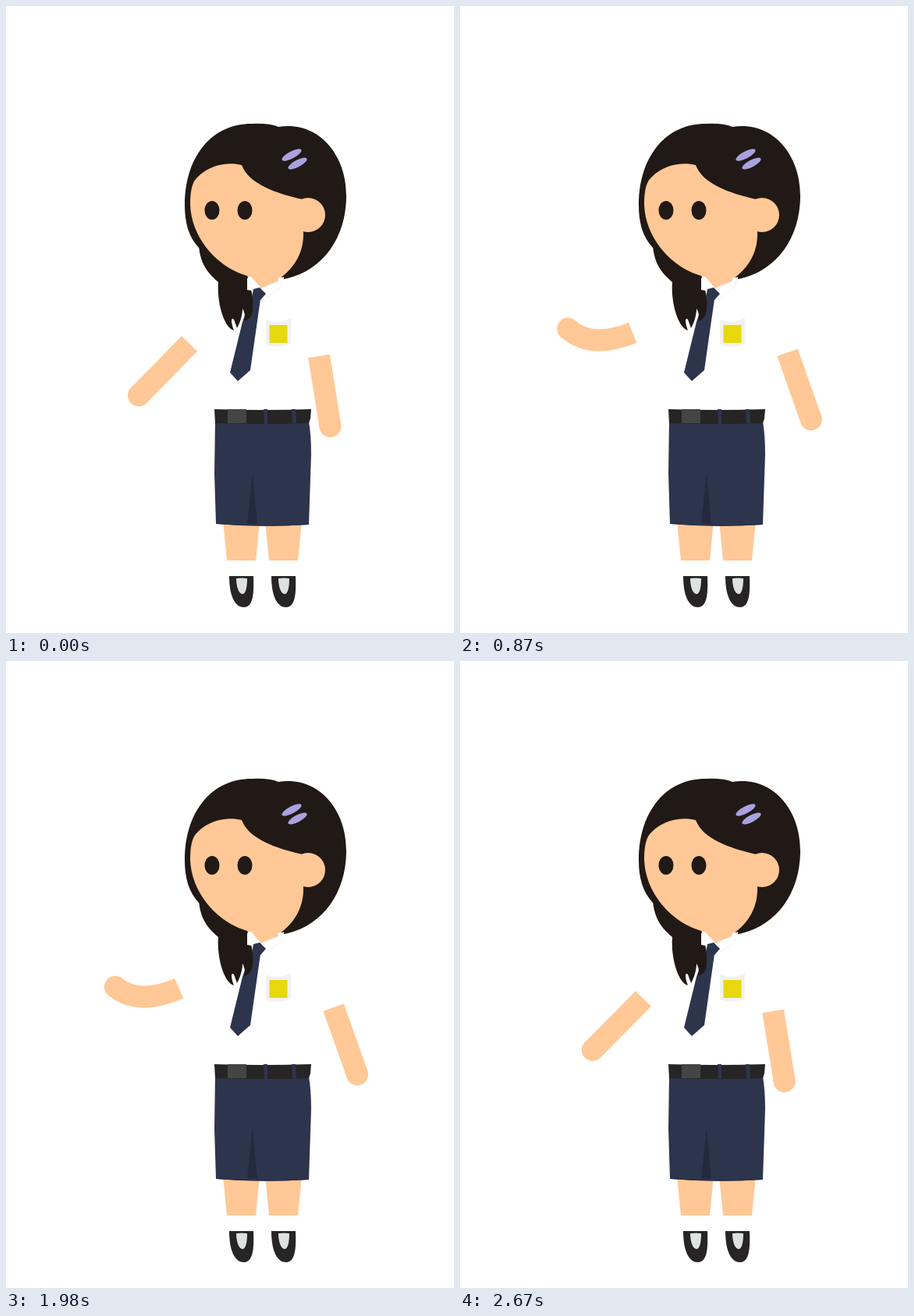
Animation of 574x804 px, one loop 2700 ms. Source, as an HTML page:

```html
<!DOCTYPE html>
<html lang="en">
<head>
<meta charset="utf-8">
<title>Waving student</title>
<style>
  html, body { margin: 0; width: 100%; height: 100%; overflow: hidden; background: #fff; }
  svg { display: block; width: 574px; height: 804px; }
  .skin { fill: #ffc896; }
  .hair { fill: #211915; }
  .navy { fill: #2d354d; }
  .dark { fill: #262424; }
  .limb { fill: none; stroke: #ffc896; stroke-width: 28; }
</style>
</head>
<body>
<svg viewBox="0 0 574 804">
  <defs>
    <g id="leg">
      <path class="skin" d="M278 660H325L320 711H283Z"/>
      <path class="dark" d="M286 731H317C318 756 316 770 305 771C292 771 286 754 286 731Z"/>
      <path fill="#dde2e0" d="M295 734Q302 733 309 734C309 746 307 754 303 754C298 754 295 744 295 734Z"/>
    </g>
  </defs>
  <use href="#leg"/>
  <use href="#leg" x="54"/>

  <path class="navy" d="M268 533L267 600L269 664Q328 669 388 665L391 575Q391 550 388 533Z"/>
  <path fill="none" stroke="#232a40" d="M269 663.5Q328 668.5 388 664.5"/>
  <path fill="#232a40" d="M316 598L309 663L322 664Z"/>
  <path class="dark" d="M267 517Q330 519 391 517L390 529L388 535Q330 537 268 535Z"/>
  <path fill="#454545" d="M284 517H308V535H284Z"/>
  <path class="navy" d="M330 517H335V536H331ZM366 517H371L372 535H367Z"/>

  <path class="navy" d="M314 372L326 376L313 467L297 481L287 470L303 405Z"/>
  <path class="hair" d="M247 305C248 335 265 348 272 354C270 380 279 412 292 416C288 406 288 398 292 402L296 413C301 404 303 395 303 388C306 393 307 398 305 404C313 402 317 394 316 385C317 375 315 365 309 345Z"/>
  <path class="hair" d="M229 255C229 195 262 151 315 151Q337 150 349 155C400 147 436 190 436 243C436 300 403 343 352 351L300 345L247 310C234 296 229 278 229 255Z"/>
  <circle class="skin" cx="387" cy="268" r="22"/>
  <path class="skin" d="M236 255C236 236 239 226 244 221C258 205 282 199 302 204C311 228 345 240 380 248L388 247L381 289C382 313 372 334 350 350L348 354L327 362L314 347C278 340 238 303 236 255Z"/>
  <path fill="#fff" d="M309 349L314 348L325 361L315 365L309 364Z"/>
  <path fill="#fff" stroke="#f0f0f0" d="M329 361L349 353V349L356 348L351 361L335 373Z"/>
  <path class="navy" d="M317 363L325 361L333 369L326 377L315 373Z"/>

  <g fill="#a9a1e0">
    <ellipse cx="366" cy="191" rx="14" ry="4.5" transform="rotate(-28 366 191)"/>
    <ellipse cx="373.5" cy="202" rx="13.5" ry="4.5" transform="rotate(-28 373.5 202)"/>
  </g>
  <path fill="#f1f1f1" d="M333 402Q349 409 365 400V433Q349 440 333 434Z"/>
  <rect x="337.5" y="409" width="23" height="23" fill="#e8d80f"/>

  <g class="hair">
    <ellipse class="eye" cx="264" cy="262"/>
    <ellipse class="eye" cx="306" cy="262"/>
    <path id="lashes" d="M260 251H268V252H260ZM302 251H310V252H302Z"/>
  </g>

  <path class="limb" id="wavingArm"/>
  <circle class="skin" id="wavingHand" r="14"/>
  <g id="restingArm">
    <path class="limb" d="M401 449L415.5 539"/>
    <circle class="skin" cx="415.5" cy="539" r="14"/>
  </g>
</svg>
<script>
const LOOP = 2700, STEP = 30, START = 300, BEAT = 600;
const $ = id => document.getElementById(id);
const eyes = document.querySelectorAll('.eye');

// Each pose: shoulder x,y, elbow control x,y, hand x,y
const rest = [235, 433, 202.5, 466.5, 170, 499.5];
const up = [221, 419, 167.5, 440, 138, 412];
const low = [229, 428, 188, 464, 158, 473];
const poses = [rest, up, low, up, rest];
const raiseLag = [0, 0, 21, 10, 2, 56];
const lowerLag = [0, 0, -11, 6, -4, 2];

const ease = u => (1 - Math.cos(Math.PI * u)) / 2;
const mix = (a, b, k) => a + (b - a) * k;

function armPose(beat, u) {
  const bump = Math.sin(Math.PI * u) ** 2;
  return poses[beat].map((v, i) => {
    let p = mix(v, poses[beat + 1][i], ease(u));
    if (beat === 0) p += raiseLag[i] * bump * u;
    if (beat === 3) p += lowerLag[i] * bump * (1 - u);
    return p;
  });
}

function eyeScale(t) {
  const gap = Math.min(Math.abs(t - 690), Math.abs(t - 2280));
  return mix(0.23, 1, ease(Math.min(1, gap / 160)));
}

function draw(t) {
  const phase = Math.max(0, t - START) / BEAT;
  const beat = Math.min(3, Math.floor(phase)), u = phase - beat;

  const [sx, sy, cx, cy, hx, hy] = armPose(beat, u);
  $('wavingArm').setAttribute('d', `M${sx} ${sy}Q${cx} ${cy} ${hx} ${hy}`);
  $('wavingHand').setAttribute('cx', hx);
  $('wavingHand').setAttribute('cy', hy);

  const lift = beat === 0 ? ease(u) : beat === 3 ? 1 - ease(u) : 1;
  $('restingArm').setAttribute('transform', `rotate(${-10.3 * lift} 384 343)`);

  const open = eyeScale(t);
  for (const eye of eyes) {
    eye.setAttribute('rx', 9.5 * open);
    eye.setAttribute('ry', 12 * open);
  }
  $('lashes').style.display = open < 0.9 ? '' : 'none';
}

const origin = performance.now();
function tick() {
  const t = (performance.now() - origin) % LOOP;
  draw(Math.floor(t / STEP) * STEP);
  requestAnimationFrame(tick);
}
tick();
</script>
</body>
</html>
```
